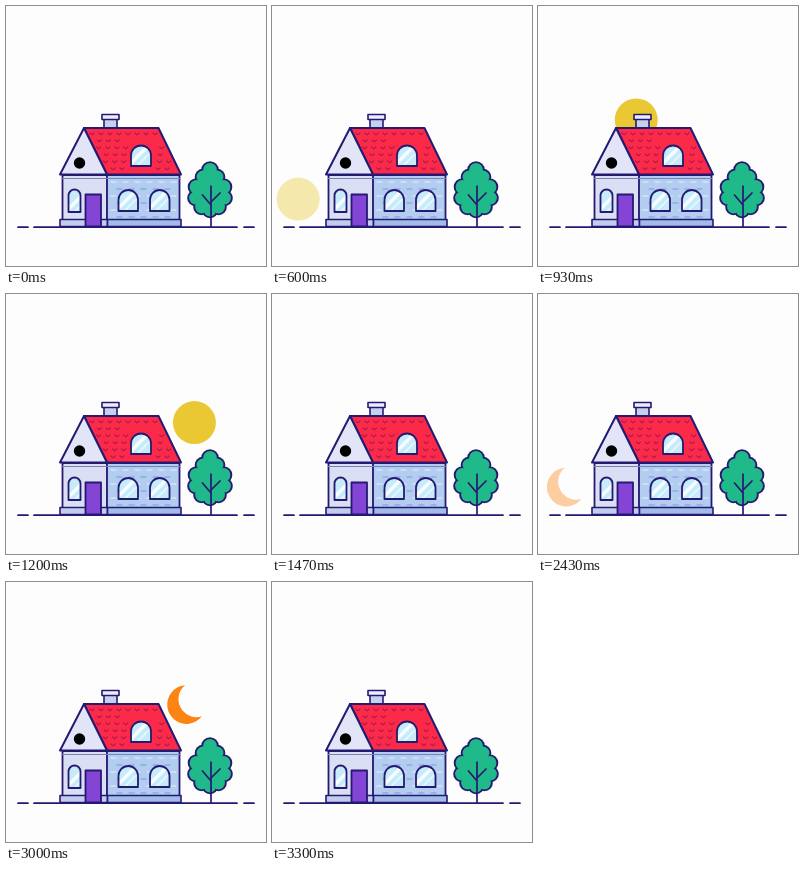
An HTML page with a canvas for the animation above (3330 ms loop, 260x260 px).

```html
<!DOCTYPE html>
<html lang="en">
<head>
<meta charset="utf-8">
<title>House by day and night</title>
<style>
  html, body { margin: 0; width: 100%; height: 100%; overflow: hidden; background: #fdfdfe; }
  canvas { display: block; width: 100vw; height: 100vh; }
</style>
</head>
<body>
<canvas id="stage"></canvas>
<script>
const SIZE = 260, LOOP = 3330, TRIP = 27;
const INK = '#251a72', LEAF = '#1fb98a';
const canvas = document.getElementById('stage');
const g = canvas.getContext('2d');

function shape(path, fill, width = 1.8, stroke = INK) {
  if (fill) { g.fillStyle = fill; g.fill(path); }
  if (width) { g.strokeStyle = stroke; g.lineWidth = width; g.stroke(path); }
}

function poly(points, fill, width) {
  shape(new Path2D('M' + points + 'Z'), fill, width);
}

function rect(x, y, w, h, fill, width) {
  const p = new Path2D();
  p.rect(x, y, w, h);
  shape(p, fill, width);
}

function line(d, width = 1.5, color = INK) {
  shape(new Path2D(d), null, width, color);
}

function disc(x, y, r, fill) {
  const p = new Path2D();
  p.arc(x, y, r, 0, Math.PI * 2);
  shape(p, fill, 0);
}

function archWindow(x, y, w, h) {
  const r = w / 2, p = new Path2D();
  p.moveTo(x, y + h);
  p.lineTo(x, y + r);
  p.arc(x + r, y + r, r, Math.PI, 0);
  p.lineTo(x + w, y + h);
  p.closePath();
  shape(p, '#c6ecfc', 0);
  g.save();
  g.clip(p);
  line(`M${x} ${y + h - 3}L${x + w} ${y + h - 3 - w}`, 3.5, '#f6fcff');
  line(`M${x + 5} ${y + h + 1}L${x + w + 5} ${y + h + 1 - w}`, 1.2, '#f6fcff');
  g.restore();
  shape(p, null, 1.8);
}

function sun() {
  disc(0, 0, 21.5, '#e9c833');
}

function moon() {
  const p = new Path2D();
  p.arc(0, 0, 19.3, 1.15, -1.15);
  p.arc(11.2, 0, 17.9, -1.755, 1.755, true);
  p.closePath();
  g.translate(2, 0);
  g.rotate(-0.5);
  shape(p, '#fb8412', 0);
}

// Half an ellipse from the left horizon to the right one
function rise(step, draw) {
  if (step <= 0 || step >= TRIP) return;
  const a = Math.PI * step / TRIP;
  g.save();
  g.globalAlpha = Math.min(1, step / 2.5, (TRIP - step) / 2.5);
  g.translate(127.5 - 102 * Math.cos(a), 204 - 94 * Math.sin(a));
  draw();
  g.restore();
}

function tiles() {
  for (let row = 0; row < 6; row++) {
    const y = 127 + row * 7;
    const left = 84 + row * 3.4, right = 151 + row * 3.3;
    for (let x = left + (row % 2) * 4; x < right - 3; x += 9) {
      if (x > 118 && x < 148 && y > 133 && y < 164) continue;
      line(`M${x} ${y}q2 3 4 0`, 1.3, '#a51a50');
    }
  }
}

function bricks() {
  for (let row = 0; row < 6; row++) {
    for (let x = 105 + (row % 2) * 6; x < 168; x += 12) {
      line(`M${x} ${176 + row * 7}h5`, 1.3, row % 2 ? '#8faadf' : '#d8e4fa');
    }
  }
}

function house() {
  rect(98, 113, 13, 9, '#c4d2ee', 1.6);
  rect(96, 108.5, 17, 5, '#eeeefa', 1.6);

  rect(56.5, 169, 45, 45, '#dadff4', 1.8);
  rect(101, 169, 72.5, 45, '#b3cdf0', 1.8);
  bricks();

  poly('78 122 152.5 122 175 168.5 101 168.5', '#fb2a48', 2);
  tiles();
  poly('78 122 54 168.5 101 168.5', '#e2e5f8', 2);
  line('M56 172.5H174', 1.2, '#7a80c0');

  rect(54, 213.5, 47.5, 7, '#c2cdee', 1.6);
  rect(101.5, 213.5, 73.5, 7, '#a2bbe8', 1.6);

  archWindow(125, 139.5, 20, 20.5);
  archWindow(112.5, 184, 19.5, 21);
  archWindow(144, 184, 19.5, 21);
  archWindow(62.5, 183.5, 12, 22.5);
  rect(79.5, 188.5, 15.5, 32, '#8444d6', 1.8);
  disc(73.5, 157, 5.7, '#000');
}

function tree() {
  const pairs = [[7, 171, 8], [13.5, 181, 8.5], [14.5, 192, 8], [8.5, 201, 8]];
  const lobes = [[204, 164, 8.5], [204, 204, 8]];
  for (const [dx, y, r] of pairs) lobes.push([204 - dx, y, r], [204 + dx, y, r]);
  for (const [x, y, r] of lobes) disc(x, y, r + 0.3, INK);
  for (const [x, y, r] of lobes) disc(x, y, r - 1.6, LEAF);
  rect(193, 170, 22, 34, LEAF, 0);
  line('M205 221V180M205 199L196.5 189M205 196L214 187', 1.7);
}

function ground() {
  line('M12 221.2H22M28 221.2H231M238 221.2H248', 1.7);
}

function frame(now) {
  const scale = devicePixelRatio || 1;
  const w = Math.round(innerWidth * scale), h = Math.round(innerHeight * scale);
  if (canvas.width !== w || canvas.height !== h) {
    canvas.width = w;
    canvas.height = h;
  }
  g.setTransform(w / SIZE, 0, 0, h / SIZE, 0, 0);
  g.lineJoin = g.lineCap = 'round';
  g.fillStyle = '#fdfdfe';
  g.fillRect(0, 0, SIZE, SIZE);

  // Thirty steps per second
  const step = Math.floor((now % LOOP) * 0.03 + 0.15);
  rise(step - 17, sun);
  rise(step - 72, moon);
  house();
  tree();
  ground();
  requestAnimationFrame(frame);
}

frame(0);
</script>
</body>
</html>
```
